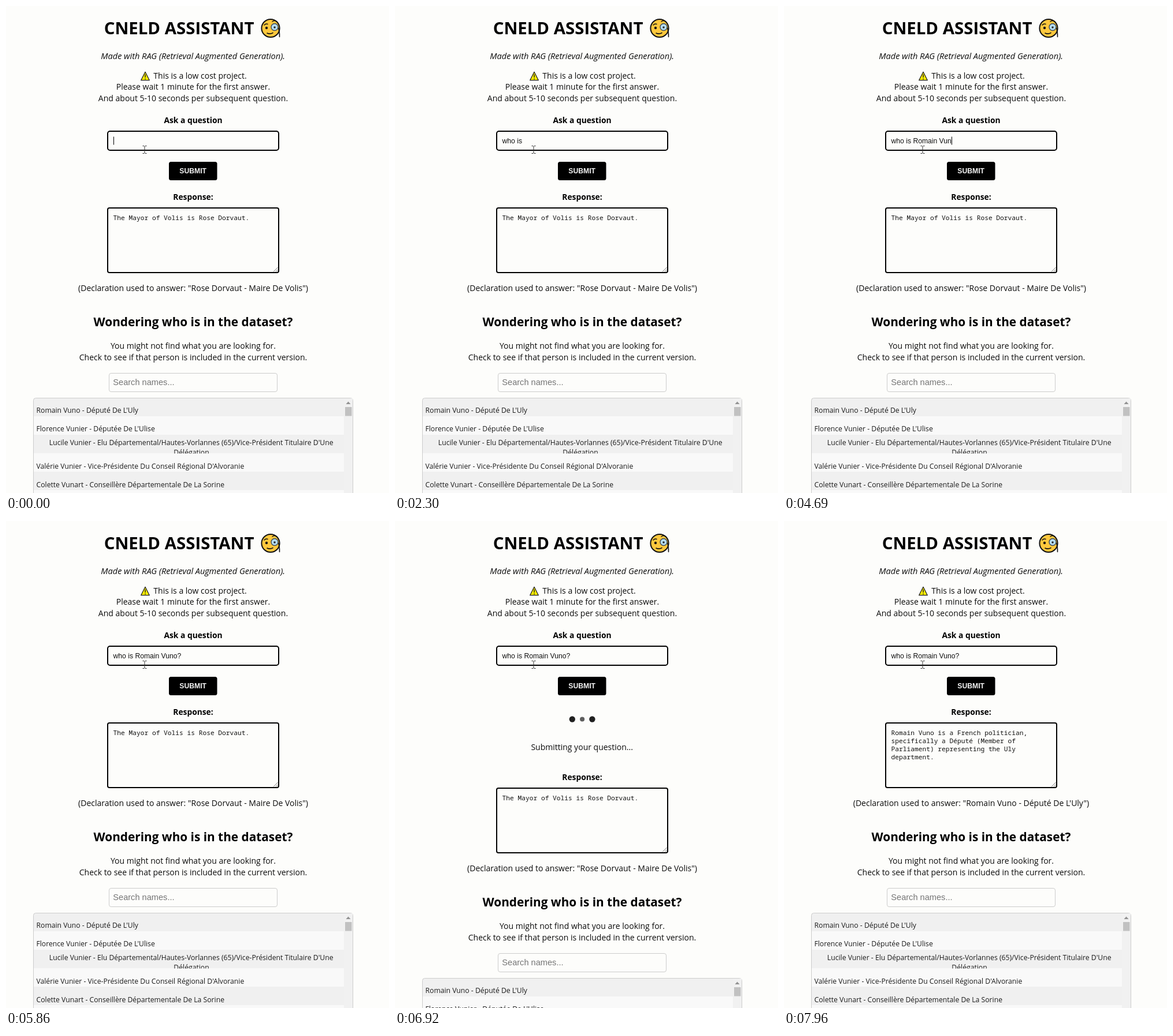
Recreate the animation shown at these times as an HTML page. Size 663 px wide and 844 px high, loop 7.99 s.

```html
<!DOCTYPE html>
<html lang="en">
<head>
<meta charset="utf-8">
<title>Assistant</title>
<style>
  html, body { margin: 0; width: 100%; height: 100%; overflow: hidden; background: #fdfdfb; }
  svg { display: block; width: 663px; height: 844px; }
  text { font: 14px "Open Sans", "Noto Sans", sans-serif; fill: #0c0c0c; white-space: pre; }
  .mid { text-anchor: middle; }
  .title { font-size: 29.4px; font-weight: 700; fill: #000; }
  .sub { font-size: 14.55px; font-style: italic; }
  .label { font-size: 13.8px; font-weight: 700; fill: #000; }
  .head { font-size: 20.8px; font-weight: 700; fill: #000; }
  .field { font: 12.15px "Liberation Sans", Arial, sans-serif; fill: #111; }
  .button { font: 700 12.2px "Liberation Sans", Arial, sans-serif; fill: #f4f4f4; }
  .hint { font: 14.6px "Liberation Sans", Arial, sans-serif; fill: #757575; }
  .mono { font: 11.22px "Noto Sans Mono", "DejaVu Sans Mono", monospace; fill: #111; }
  .row { font-size: 12.2px; fill: #1c1c1c; }
  .box { fill: #fdfdfb; stroke: #000; stroke-width: 2; }
  .thin { fill: #fdfdfb; stroke: #ccc; }
</style>
</head>
<body>
<svg viewBox="0 0 663 844">
  <defs>
    <clipPath id="thirdRow"><rect x="47" y="743" width="538" height="32.5"/></clipPath>
  </defs>
  <rect width="663" height="844" fill="#fdfdfb"/>

  <text class="title mid" x="299.6" y="48.6">CNELD ASSISTANT</text>
  <g fill="none" stroke="#111" stroke-linecap="round">
    <circle cx="458" cy="38.5" r="15.6" fill="#ffc83d" stroke-width="2"/>
    <path d="M447 33q3-3 6-1.5M461 27q4-3 8 0" stroke-width="1.5"/>
    <circle cx="451" cy="38" r="2.2" fill="#111" stroke="none"/>
    <path d="M452 47q5 2.5 10-.5" stroke-width="1.6"/>
    <path d="M471.5 38q2.5 7 2 15.5" stroke-width="1.5"/>
    <circle cx="465" cy="36.5" r="6" fill="#b4dcf0" stroke="#3c4a55" stroke-width="1.4"/>
    <circle cx="465" cy="37" r="1.7" fill="#222" stroke="none"/>
  </g>

  <text class="sub mid" x="323.7" y="92">Made with RAG (Retrieval Augmented Generation).</text>
  <path d="M241 114.3L248.3 128.7H233.7Z" fill="#fff100" stroke="#222" stroke-width="1.3" stroke-linejoin="round"/>
  <path d="M241 118.6V124M241 125.6V127.2" stroke="#222" stroke-width="1.5"/>
  <text class="mid" x="336" y="126">This is a low cost project.</text>
  <text class="mid" x="324" y="145">Please wait 1 minute for the first answer.</text>
  <text class="mid" x="324" y="164.5">And about 5-10 seconds per subsequent question.</text>

  <text class="label mid" x="324" y="202.7">Ask a question</text>
  <rect class="box" x="176" y="217" width="296" height="33" rx="4"/>
  <text class="field" id="typed" x="185.6" y="237.8"></text>
  <rect id="caret" y="226.5" width="1" height="14" fill="#000"/>
  <path d="M236.5 242.5h2.5l1 1 1-1h2.5M240 243.5v11M236.5 255.5h2.5l1-1 1 1h2.5" fill="none" stroke="#333"/>

  <rect x="282" y="270" width="83.5" height="32" rx="3.5"/>
  <text class="button mid" x="323.7" y="290.3">SUBMIT</text>

  <g id="loader">
    <circle class="dot" cx="306.8" cy="343.5"/>
    <circle class="dot" cx="324.1" cy="343.5"/>
    <circle class="dot" cx="341.4" cy="343.5"/>
    <text class="mid" x="323.7" y="397">Submitting your question...</text>
  </g>

  <g id="lower">
    <text class="label mid" x="324" y="336">Response:</text>
    <rect class="box" x="176" y="350" width="296" height="112" rx="3"/>
    <path d="M463 460.5l7.5-7.5M467 460.5l3.5-3.5" stroke="#777" fill="none"/>
    <g id="reply"></g>
    <text class="mid" id="used" x="324" y="494"></text>

    <text class="head mid" x="324" y="554.6">Wondering who is in the dataset?</text>
    <text class="mid" x="324" y="594.3">You might not find what you are looking for.</text>
    <text class="mid" x="324" y="613.6">Check to see if that person is included in the current version.</text>

    <rect class="thin" x="178.5" y="636.5" width="291" height="32" rx="3.5"/>
    <text class="hint" x="185.3" y="657.3">Search names...</text>

    <rect x="47.5" y="679.5" width="553" height="300" rx="4" fill="#f0f0f0" stroke="#ccc"/>
    <path d="M48 711h537v32h-537zM48 775h537v32h-537zM48 839h537v32h-537z" fill="#f9f9f9"/>
    <rect x="585" y="680" width="15" height="290" fill="#f1f1f1"/>
    <path d="M588.5 690l4-4.5 4 4.5z" fill="#929292"/>
    <rect x="587" y="695" width="11.5" height="15.5" fill="#c1c1c1"/>
    <text class="row" x="52.5" y="705">Romain Vuno - Député De L'Uly</text>
    <text class="row" x="52.5" y="737">Florence Vunier - Députée De L'Ulise</text>
    <g clip-path="url(#thirdRow)">
      <text class="row mid" x="320.7" y="761.3">Lucile Vunier - Elu Départemental/Hautes-Vorlannes (65)/Vice-Président Titulaire D'Une</text>
      <text class="row mid" x="321" y="778.3">Délégation</text>
    </g>
    <text class="row" x="52.5" y="801.5">Valérie Vunier - Vice-Présidente Du Conseil Régional D'Alvoranie</text>
    <text class="row" x="52.5" y="833.5">Colette Vunart - Conseillère Départementale De La Sorine</text>
  </g>
</svg>
<script>
  const LOOP = 7990, SENT = 6020, ANSWERED = 7930, BLINK = 500;
  const QUESTION = "who is Romain Vuno?";

  // [time, number of characters shown]
  const KEYS = [
    [0, 0], [930, 1], [990, 2], [1050, 3], [1130, 4], [1200, 5], [1260, 6], [1330, 7],
    [2330, 8], [2560, 9], [2590, 10], [2630, 11], [2660, 12], [2830, 13], [3100, 14],
    [3300, 13], [3430, 12], [3530, 10], [3630, 11], [3690, 12], [3800, 13], [3860, 14],
    [4030, 15], [4200, 16], [4400, 17], [4790, 18], [5190, 19], [5360, 19]
  ];
  const REPLIES = [
    { lines: ["The Mayor of Volis is Rose Dorvaut."], used: "Rose Dorvaut - Maire De Volis" },
    { lines: ["Romain Vuno is a French politician,", "specifically a Député (Member of",
              "Parliament) representing the Uly", "department."],
      used: "Romain Vuno - Député De L'Uly" }
  ];

  const $ = id => document.getElementById(id);
  const dots = document.querySelectorAll(".dot");
  const pen = document.createElement("canvas").getContext("2d");
  pen.font = '12.15px "Liberation Sans", Arial, sans-serif';
  let shown = -1;

  function showReply(i) {
    if (i === shown) return;
    shown = i;
    const { lines, used } = REPLIES[i];
    $("reply").innerHTML = lines
      .map((s, n) => `<text class="mono" x="185.6" y="${371.3 + n * 14}">${s}</text>`).join("");
    $("used").textContent = `(Declaration used to answer: "${used}")`;
  }

  function drawInput(t) {
    const [time, count] = KEYS.filter(k => k[0] <= t).pop();
    const text = QUESTION.slice(0, count);
    $("typed").textContent = text;
    $("caret").setAttribute("x", Math.round(186 + pen.measureText(text).width));
    const on = time === 0 || (t - time) % (2 * BLINK) < BLINK;
    $("caret").style.display = on ? "" : "none";
  }

  function drawLoader(t) {
    const busy = t >= SENT && t < ANSWERED;
    $("loader").style.display = busy ? "" : "none";
    $("lower").setAttribute("transform", `translate(0 ${busy ? 113 : 0})`);
    if (!busy) return;
    const wave = Math.abs(1 - ((t - SENT) % 800) / 400);
    dots.forEach((dot, i) => {
      const k = i === 1 ? 1 - wave : wave;
      dot.setAttribute("r", 3.46 + 2.31 * k);
      dot.setAttribute("fill-opacity", 0.5 + 0.5 * k);
    });
  }

  const start = performance.now();
  function draw() {
    const t = (performance.now() - start) % LOOP;
    drawInput(t);
    drawLoader(t);
    showReply(t < ANSWERED ? 0 : 1);
    requestAnimationFrame(draw);
  }
  draw();
</script>
</body>
</html>
```
